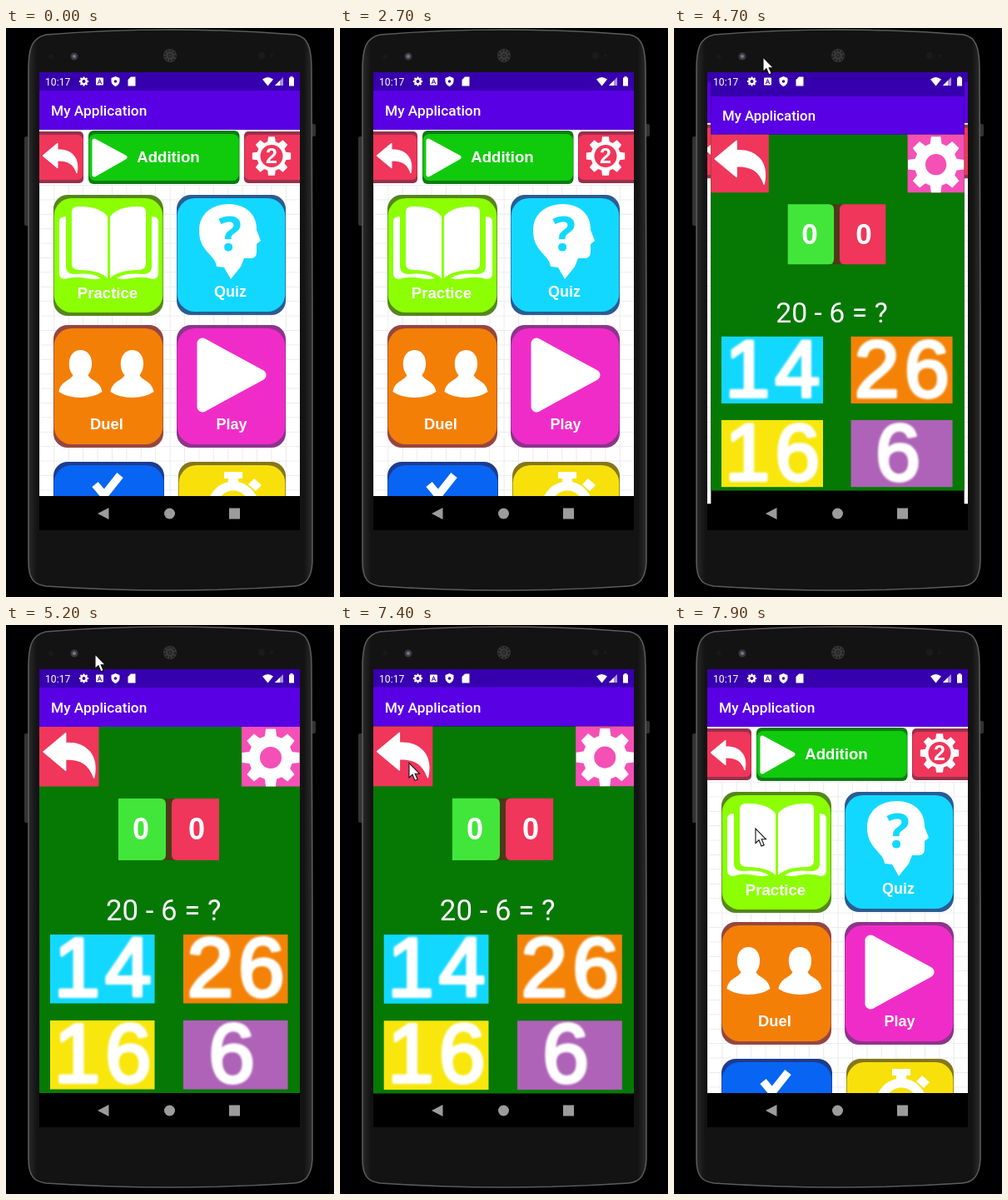
Write an HTML page that moves like this. It is 394 by 682 pixels and loops after 8000 ms.

```html
<!DOCTYPE html>
<html lang="en">
<head>
<meta charset="utf-8">
<title>Maths app</title>
<style>
  html, body { margin: 0; width: 100%; height: 100%; overflow: hidden; background: #000; }
  svg { display: block; width: 394px; height: 682px; }
  text { fill: #fff; }
  .ui { font-family: Roboto, sans-serif; }
  .label { font-family: "Liberation Sans", Arial, sans-serif; font-weight: bold; text-anchor: middle; }
  .soft { filter: url(#soft); }
  .soft text { font-weight: normal; letter-spacing: 6px; stroke: #fff; stroke-width: 4; stroke-linejoin: round; }
  #mark { font-family: "Open Sans", sans-serif; fill: #12d8ff; }
</style>
</head>
<body>
<svg viewBox="0 0 394 682">
  <defs>
    <clipPath id="screen"><rect x="40" y="53" width="313" height="549"/></clipPath>
    <clipPath id="content"><rect x="40" y="122" width="313" height="439"/></clipPath>
    <filter id="soft"><feGaussianBlur stdDeviation="1.3"/></filter>
    <pattern id="paper" x="40" y="188" width="17.4" height="17.4" patternUnits="userSpaceOnUse">
      <path d="M0 .5H17.4M.5 0V17.4" stroke="#ebebf0" fill="none"/>
    </pattern>
    <linearGradient id="body">
      <stop offset="0" stop-color="#2a2a2a"/><stop offset=".03" stop-color="#131313"/>
      <stop offset=".97" stop-color="#131313"/><stop offset="1" stop-color="#2c2c2c"/>
    </linearGradient>
    <path id="arrow" d="M0 0L18-15V-7C34-8 45 2 41 21C37 10 31 6 18 6V15Z" fill="#fff" stroke="#fff" stroke-linejoin="round"/>
    <path id="person" fill="#fff" d="M-26 436C-24 423-12 423-9 416C-17 407-15 386 0 386S17 407 9 416C12 423 24 423 26 436Q16 443 0 443T-26 436Z"/>
    <g id="bookHalf" fill="#fff">
      <path d="M79 221Q79 214 86 214Q112 213 122 226V300Q112 290 88 290Q79 290 79 282Z"/>
      <path d="M64 232Q64 226 72 226V287Q73 295 82 295Q104 293 114 300Q106 302 97 300Q82 297 71 301Q64 301 64 294Z"/>
    </g>
    <g id="bars">
      <rect x="40" y="53" width="313" height="549"/>
      <rect x="40" y="53" width="313" height="23" fill="#3700ae"/>
      <rect x="40" y="75" width="313" height="47" fill="#5a00e4"/>
      <text class="ui" x="54" y="105" font-size="17.3" font-weight="500">My Application</text>
    </g>
  </defs>

  <rect width="394" height="682"/>
  <rect x="22" y="130" width="6" height="107" rx="2" fill="#333"/>
  <rect x="366" y="115" width="6" height="15" rx="2" fill="#333"/>
  <path fill="url(#body)" stroke="#5c5c5c" stroke-width="1.5" d="M27 50C27 24 31 12 48 8Q197-4 348 8C363 11 367 24 367 50L368 340V640C367 661 359 668 346 669Q197 679 48 669C34 667 27 661 27 640Z"/>
  <circle cx="82" cy="34" r="4.5" fill="#3a3a40"/><circle cx="82" cy="34" r="2" fill="#77778a"/>
  <circle cx="54" cy="34" r="3" fill="#191919"/>
  <circle cx="197" cy="33" r="8" fill="#383838"/>
  <circle cx="197" cy="33" r="6" fill="none" stroke="#1c1c1c" stroke-width="2" stroke-dasharray="2 2"/>
  <circle cx="197" cy="33" r="2" fill="none" stroke="#1c1c1c"/>
  <circle cx="307" cy="33" r="4" fill="#1d1a1a"/><circle cx="319" cy="33" r="2" fill="#1d1a1a"/>

  <g clip-path="url(#screen)">
    <g id="menu">
      <use href="#bars"/>
      <g clip-path="url(#content)">
        <rect x="40" y="122" width="313" height="439" fill="#fff"/>
        <rect x="40" y="188" width="313" height="373" fill="url(#paper)"/>
        <g id="tiles"></g>
        <use href="#arrow" x="44" y="153"/>
        <path d="M106 135L143 155L106 176Z" fill="#fff" stroke="#fff" stroke-width="5" stroke-linejoin="round"/>
        <path id="levelGear" fill="#fff" fill-rule="evenodd"/>
        <use href="#bookHalf"/>
        <use href="#bookHalf" transform="matrix(-1 0 0 1 247 0)"/>
        <path fill="#fff" d="M253 286C252 272 232 268 232 243C232 222 248 211 268 211C290 211 302 226 301 242L306 255L301 259V268Q301 276 294 276H286L282 286L270 301L262 287Z"/>
        <text id="mark" class="label" x="269" y="267" font-size="58">?</text>
        <use href="#person" x="89.5"/><use href="#person" x="151.5"/>
        <path d="M236 378L306 416L236 454Z" fill="#fff" stroke="#fff" stroke-width="13" stroke-linejoin="round"/>
        <path d="M107 547L118 560L137 536" fill="none" stroke="#fff" stroke-width="9.5"/>
        <circle cx="273" cy="574" r="25" fill="none" stroke="#fff" stroke-width="11"/>
        <path d="M262 532H284V540H279V546H267V540H262ZM298 540L307 548L300 555L291 547Z" fill="#fff"/>
        <g id="menuLabels"></g>
      </g>
    </g>

    <g id="game">
      <use href="#bars"/>
      <rect x="40" y="122" width="313" height="439" fill="#067804"/>
      <rect x="40" y="122" width="71.5" height="71.5" fill="#f0365a"/>
      <use href="#arrow" transform="translate(45 152) scale(1.48)"/>
      <rect x="283" y="122" width="70" height="71.5" fill="#f450b6"/>
      <path id="optionsGear" fill="#fff" fill-rule="evenodd"/>
      <rect x="186" y="208" width="19" height="74" fill="#4a3a18"/>
      <path d="M135 208H186Q192 208 192 215V275Q192 282 186 282H135Z" fill="#42e63a"/>
      <path d="M256 208H205Q199 208 199 215V275Q199 282 205 282H256Z" fill="#f0365a"/>
      <text class="label" x="162" y="257" font-size="36">0</text>
      <text class="label" x="229" y="257" font-size="36">0</text>
      <text class="ui" x="120" y="354" font-size="34.8">20 - 6 = ?</text>
      <g id="answers"></g>
    </g>

    <use id="menuAgain" href="#menu"/>

    <g fill="#fff">
      <text class="ui" x="47" y="69" font-size="12.2">10:17</text>
      <path id="statusGear" fill-rule="evenodd"/>
      <rect x="108" y="59.5" width="9" height="9" rx="1"/>
      <path d="M110.3 67L112.5 61.5L114.7 67M111.3 65.2H113.7" fill="none" stroke="#3700ae"/>
      <path d="M131.500 58L136.500 60V64Q136 68 131.500 70Q127 68 126.500 64V60Z"/>
      <circle cx="131.5" cy="64" r="1.8" fill="#3700ae"/>
      <path d="M150 58.5H155.500V69.500H146.500V62Z"/>
      <path d="M308 61.5Q314.500 56.500 321 61.500L314.500 69.500Z"/>
      <path d="M333 59V69H323Z" fill="#a98fe0"/><path d="M329 63V69H323Z"/>
      <path d="M340 59.500H341.500V58H344.500V59.500H346V69.500H340Z"/>
    </g>
    <g fill="#9c9c9c">
      <path d="M110 582L123.500 575V589Z"/>
      <circle cx="196.5" cy="582" r="6.5"/>
      <rect x="268" y="575.5" width="13" height="13"/>
    </g>
  </g>
  <path id="cursor" d="M0 0V17.500L4 13.800L7 21L10.200 19.600L7.200 12.800H12.500Z" fill="#fff" stroke="#111" stroke-width="1.1"/>
</svg>
<script>
const $ = id => document.getElementById(id);
const LOOP = 8000, OPEN_GAME = 4590, OPEN_MENU = 7373, SLIDE = 400;

// The fill is rounder than its border, so the dark edge shows at top, bottom and corners.
function tile(x, y, w, h, fill, border, r = 17) {
  return `<rect x="${x}" y="${y}" width="${w}" height="${h}" rx="${r}" fill="${border}"/>
    <rect x="${x + .7}" y="${y + 4}" width="${w - 1.4}" height="${h - 8}" rx="${r * 1.25}" fill="${fill}"/>`;
}

function label(text, x, y, size) {
  return `<text class="label" x="${x}" y="${y}" font-size="${size}">${text}</text>`;
}

function gear(cx, cy, r, hole) {
  const points = [];
  for (let i = 0; i < 8; i++) {
    for (const [turn, reach] of [[-.27, .76], [-.17, 1], [.17, 1], [.27, .76]]) {
      const a = i * Math.PI / 4 + turn;
      points.push(`${cx + Math.cos(a) * r * reach} ${cy + Math.sin(a) * r * reach}`);
    }
  }
  return `M${points.join('L')}ZM${cx - hole} ${cy}a${hole} ${hole} 0 1 0 ${2 * hole} 0a${hole} ${hole} 0 1 0 ${-2 * hole} 0Z`;
}

$('tiles').innerHTML = [
  [30, 124, 63, 62, '#f0365a', '#98304c', 5],
  [99, 123, 181.5, 64, '#10ca0c', '#0c7c14', 6],
  [286, 124, 80, 62, '#f0365a', '#98304c', 5],
  [57, 200, 132, 145, '#8cff04', '#55861c'],
  [205, 200, 131, 144, '#12d8ff', '#2a5c94'],
  [57, 356, 132, 147, '#f47f06', '#964640'],
  [205, 356, 131, 147, '#f02cc8', '#8c348c'],
  [57, 520, 133, 145, '#0864f2', '#1c3c90'],
  [207, 520, 129, 145, '#f8e00a', '#86761c']
].map(t => tile(...t)).join('');

$('menuLabels').innerHTML = [
  ['Addition', 195, 161, 18.6], ['2', 319, 162, 25], ['Practice', 122, 324, 18.6],
  ['Quiz', 269.5, 321.5, 18], ['Duel', 121, 481, 18.4], ['Play', 271, 481, 18]
].map(t => label(...t)).join('');

$('answers').innerHTML = [
  ['14', 53, 371, '#12d8ff'], ['26', 213, 371, '#f48206'],
  ['16', 53, 474, '#f8e60c'], ['6', 213, 474, '#ae62b8']
].map(([n, x, y, fill]) => `<rect x="${x}" y="${y}" width="125.5" height="82.5" fill="${fill}"/>
  <g class="soft">${label(n, x + (n === '6' ? 61 : 66), y + 74, 100)}</g>`).join('');

$('levelGear').setAttribute('d', gear(319, 153.5, 23.5, 13.5));
$('optionsGear').setAttribute('d', gear(318, 159, 35, 13));
$('statusGear').setAttribute('d', gear(93.5, 64, 5.7, 2));

const clamp = v => Math.min(1, Math.max(0, v));
const cubic = (a, b, c, d, u) =>
  a * (1 - u) ** 3 + 3 * b * u * (1 - u) ** 2 + 3 * c * u * u * (1 - u) + d * u ** 3;

// Android's "fast out, extra slow in" curve: two joined Béziers.
function windowEase(x) {
  const [xs, ys] = x < 1 / 6
    ? [[0, .05, .1333, 1 / 6], [0, 0, .06, .4]]
    : [[1 / 6, .2083, .25, 1], [.4, .82, 1, 1]];
  let lo = 0, hi = 1;
  for (let i = 0; i < 24; i++) {
    const mid = (lo + hi) / 2;
    if (cubic(...xs, mid) < x) lo = mid; else hi = mid;
  }
  return cubic(...ys, lo);
}

function setWindow(el, scale, opacity, visible) {
  el.setAttribute('transform', `translate(196.5 328) scale(${scale}) translate(-196.5 -328)`);
  el.setAttribute('opacity', opacity);
  el.setAttribute('display', visible ? 'inline' : 'none');
}

// time, x, y of the pointer tip
const path = [
  [2900, 236, 606], [3600, 142, 297], [4250, 142, 297], [4700, 107, 35],
  [6150, 107, 35], [6600, 83, 134], [7250, 83, 134], [7500, 83, 182], [7900, 98, 244]
];

function pointer(t) {
  const next = path.findIndex(k => k[0] > t);
  if (next === 0) return null;
  if (next < 0) return path[path.length - 1].slice(1);
  const [t0, x0, y0] = path[next - 1], [t1, x1, y1] = path[next];
  const u = (t - t0) / (t1 - t0), e = u * u * (3 - 2 * u);
  return [x0 + (x1 - x0) * e, y0 + (y1 - y0) * e];
}

function render(t) {
  const sinceGame = t - OPEN_GAME, sinceMenu = t - OPEN_MENU;
  const p = windowEase(clamp(sinceGame / SLIDE)), q = windowEase(clamp(sinceMenu / SLIDE));
  const fade = since => clamp((since - 35) / 50);

  // The menu below stays unscaled for reuse once it opens again on top.
  if (sinceMenu > 0) setWindow($('menu'), 1, 1, true);
  else setWindow($('menu'), 1 + .05 * p, 1, sinceGame < SLIDE);
  setWindow($('game'), sinceMenu > 0 ? 1 + .05 * q : .85 + .15 * p,
    fade(sinceGame), sinceGame > 0 && sinceMenu < SLIDE);
  setWindow($('menuAgain'), .85 + .15 * q, fade(sinceMenu), sinceMenu > 0);

  const tip = pointer(t);
  $('cursor').setAttribute('display', tip ? 'inline' : 'none');
  if (tip) $('cursor').setAttribute('transform', `translate(${tip})`);
}

const start = performance.now();
function tick() {
  render((performance.now() - start) % LOOP);
  requestAnimationFrame(tick);
}
tick();
</script>
</body>
</html>
```
